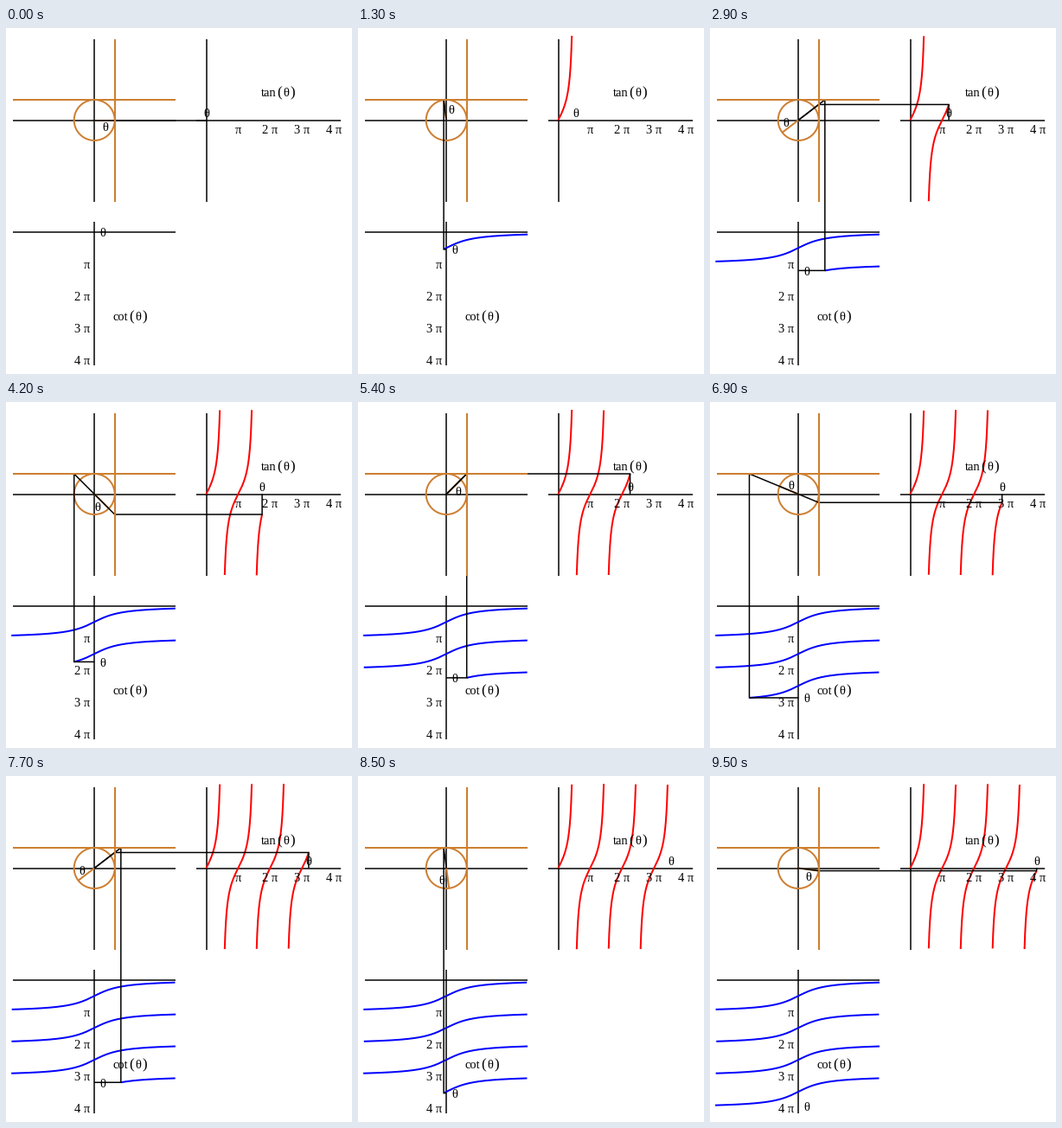
Write a matplotlib script that moves like this. It is 400 px wide and 400 px high and loops after 9.6 s.

```python
import numpy as np
import matplotlib.pyplot as plt
from matplotlib.animation import FuncAnimation

FRAMES, INTERVAL = 96, 100
DPI = 100
PX = 72 / DPI                 # points per pixel
CX, CY, R = 102.2, 106.5, 23.5
TAN_X, COT_Y = 231.5, 235.8   # where theta = 0 on each graph
STEP = R / 2                  # pixels per radian
LIMIT = 4
GOLD = "#CD7F32"

fig = plt.figure(figsize=(4, 4), dpi=DPI, facecolor="white")
ax = fig.add_axes([0, 0, 1, 1])
ax.set_xlim(0, 400)
ax.set_ylim(400, 0)
ax.axis("off")


def line(xs=(), ys=(), color="black", width=1.5, z=1):
    return ax.plot(xs, ys, color=color, lw=width * PX, zorder=z,
                   solid_capstyle="butt", solid_joinstyle="miter")[0]


def text(x, base, s, ha="center", size=14.5):
    return ax.text(x, base, s, ha=ha, va="baseline", fontsize=size * PX,
                   family="Liberation Serif", color="black", zorder=6)


def title(x, base, name):
    text(x, base, name, "left")
    text(x + 21.5, base + 0.5, "(", size=17)
    text(x + 28.7, base, "θ")
    text(x + 36.5, base + 0.5, ")", size=17)


# Coordinate axes
span = R * LIMIT
line([CX - span, CX + span], [CY, CY])
line([CX, CX], [CY - span, CY + span])
line([TAN_X - STEP, 387], [CY, CY])
line([TAN_X, TAN_X], [CY - span, CY + span])
line([CX - span, CX + span], [COT_Y, COT_Y])
line([CX, CX], [COT_Y - STEP, 390])

# Unit circle with its two tangents
turn = np.linspace(0, 2 * np.pi, 181)
line(CX + R * np.cos(turn), CY + R * np.sin(turn), GOLD, 2, 2)
line([CX - span, CX + span], [CY - R, CY - R], GOLD, 2, 5)
line([CX + R, CX + R], [CY - span, CY + span], GOLD, 2, 5)

# Fixed labels
for n in range(1, 5):
    label = "π" if n == 1 else f"{n} π"
    offset = n * np.pi * STEP
    text(TAN_X + offset, 122.5, label)
    text(97, COT_Y + offset + 5.5, label, "right")
title(295, 79, "tan")
title(124, 338, "cot")

# Moving parts
radius = line(color=GOLD, width=2, z=2)
tan_curve = line(color="red", width=2, z=3)
cot_curve = line(color="blue", width=2, z=3)
tan_link = line(z=4)
cot_link = line(z=4)
angle_mark = text(0, 0, "θ")
tan_mark = text(0, 0, "θ")
cot_mark = text(0, 0, "θ")


def ratio(a, b):
    return a / np.where(np.abs(b) < 1e-9, 1e-9, b)


def keep(values, low, high):
    return np.where((values >= low) & (values <= high), values, np.nan)


def draw(k):
    theta = 4 * np.pi * k / FRAMES
    c, s = np.cos(theta), np.sin(theta)
    tan, cot = float(ratio(s, c)), float(ratio(c, s))
    tx, ty = TAN_X + STEP * theta, CY - R * tan
    kx, ky = CX + R * cot, COT_Y + STEP * theta

    radius.set_data([CX, CX + R * c], [CY, CY - R * s])
    if abs(tan) < LIMIT:
        tan_link.set_data([CX, CX + R, tx, tx], [CY, ty, ty, CY])
    else:
        tan_link.set_data([], [])
    if abs(cot) < LIMIT:
        cot_link.set_data([CX, kx, kx, CX], [CY, CY - R, ky, ky])
    else:
        cot_link.set_data([], [])

    t = np.linspace(0, theta, 4001)
    sin, cos = np.sin(t), np.cos(t)
    tan_curve.set_data(TAN_X + STEP * t,
                       keep(CY - R * ratio(sin, cos), 9, CY + span))
    cot_curve.set_data(keep(CX + R * ratio(cos, sin), 6, CX + span),
                       COT_Y + STEP * t)

    # The angle label trails the radius by 30 degrees
    a = theta - np.pi / 6
    angle_mark.set_position((CX + 0.6 * R * np.cos(a),
                             CY + 5.5 - 0.6 * R * np.sin(a)))
    tan_mark.set_position((tx, 103))
    cot_mark.set_position((112, ky + 5.5))
    return (radius, tan_link, cot_link, tan_curve, cot_curve,
            angle_mark, tan_mark, cot_mark)


anim = FuncAnimation(fig, draw, frames=FRAMES, interval=INTERVAL,
                     repeat=True, repeat_delay=0)
plt.show()
```
